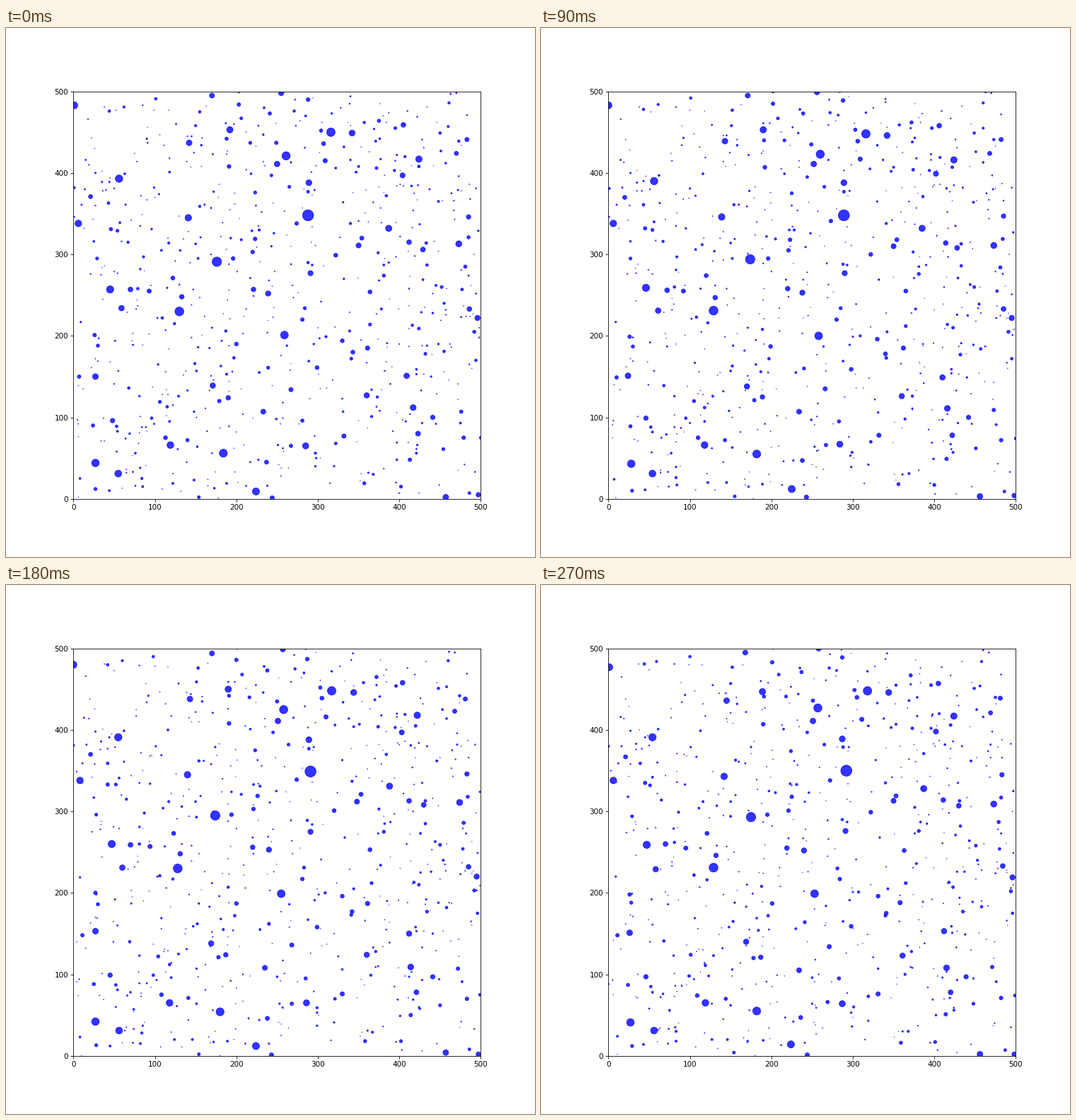
These frames come from a looping animation (748x748 px, 300 ms). A matplotlib script:

```python
import numpy as np
import matplotlib.pyplot as plt
from matplotlib.animation import FuncAnimation

SIZE, INCHES = 748, 10
DPI = SIZE / INCHES
FRAMES, INTERVAL = 10, 30
WORLD = 500
COUNT = 680

# Starting points of the largest particles, biggest first
LARGE = [
    (288, 348), (176, 291), (130, 230), (316, 450), (261, 421),
    (184, 56), (259, 201), (27, 44), (56, 393), (45, 257),
    (224, 9), (1, 483), (55, 31), (119, 66), (6, 338),
    (141, 345), (424, 417), (192, 453), (387, 332), (285, 65),
]

rng = np.random.default_rng(7)

# Diameter in pixels falls off with rank
diameter = 16 * np.exp(-0.158 * np.arange(COUNT) ** 0.433)


def scatter_rest(placed):
    """Add random particles that do not touch those already placed."""
    points = list(placed)
    while len(points) < COUNT:
        spot = rng.integers(0, WORLD + 1, 2)
        gaps = np.hypot(*(np.array(points) - spot).T)
        reach = (diameter[:len(points)] + diameter[len(points)]) / 2 + 2
        if np.all(gaps > reach):
            points.append(spot)
    return np.array(points)


def random_walk(start):
    """Positions as an array of (frame, particle, axis)."""
    steps = rng.integers(-1, 2, (FRAMES, COUNT, 2))
    steps[0] = 0
    return np.clip(start + steps.cumsum(axis=0), 0, WORLD)


paths = random_walk(scatter_rest(LARGE))

fig, ax = plt.subplots(figsize=(INCHES, INCHES), dpi=DPI)
ticks = range(0, WORLD + 1, 100)
ax.set_aspect("equal")
ax.set(xlim=(0, WORLD), ylim=(0, WORLD), xticks=ticks, yticks=ticks)

points = diameter * 72 / DPI
rim = np.minimum(0.8, points / 3)
dots = ax.scatter(*paths[0].T, s=(points - rim / 2) ** 2, c="blue",
                  alpha=0.8, linewidths=rim)


def update(frame):
    dots.set_offsets(paths[frame % FRAMES])
    return (dots,)


anim = FuncAnimation(fig, update, frames=FRAMES, interval=INTERVAL,
                     repeat=True, repeat_delay=0)
plt.show()
```
